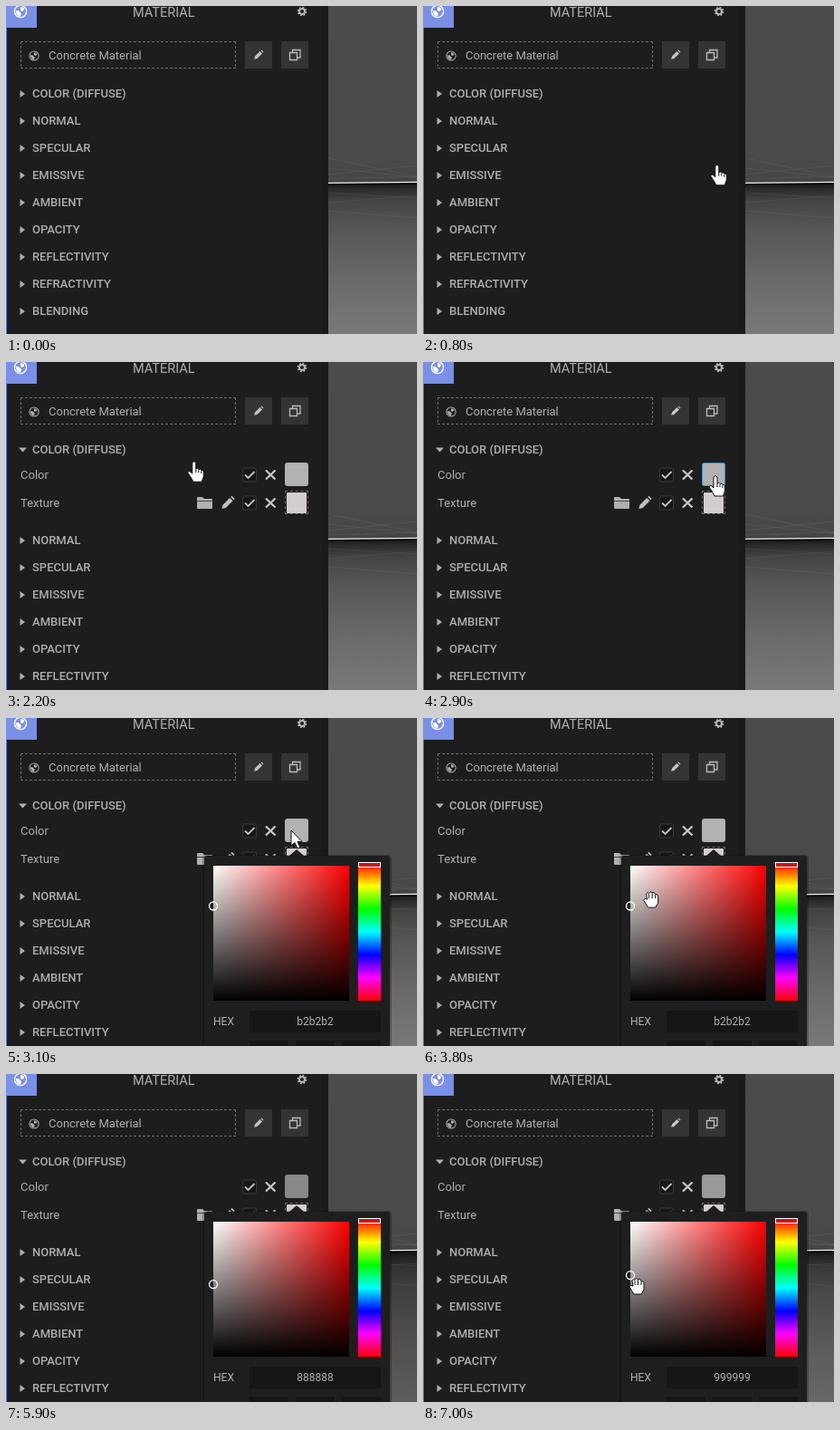
Write an HTML page that moves like this. It is 454 by 362 pixels and loops after 7100 ms.

```html
<!DOCTYPE html>
<html>
<head>
<meta charset="utf-8">
<style>
  html, body { margin: 0; width: 100%; height: 100%; overflow: hidden; background: #1d1d1d; }
  svg { display: block; font: 13px Roboto, sans-serif; fill: #b0b0b0; }
  .row { font-weight: 500; fill: #aeaeae; }
  .cursor { fill: #fff; stroke: #111; stroke-linejoin: round; }
</style>
</head>
<body>
<svg width="454" height="362" viewBox="0 0 454 362">
  <defs>
    <linearGradient id="wall" x2="0" y2="1">
      <stop stop-color="#4b4b4b"/><stop offset=".85" stop-color="#4a4a4a"/><stop offset="1" stop-color="#454545"/>
    </linearGradient>
    <linearGradient id="floor" x2="0" y2="1">
      <stop stop-color="#141414"/><stop offset=".04" stop-color="#2a2a2a"/><stop offset=".12" stop-color="#454443"/>
      <stop offset=".3" stop-color="#585654"/><stop offset=".65" stop-color="#6c6a68"/><stop offset="1" stop-color="#7b7977"/>
    </linearGradient>
    <linearGradient id="sat"><stop stop-color="#fff"/><stop offset="1" stop-color="#f00"/></linearGradient>
    <linearGradient id="val" x2="0" y2="1"><stop stop-opacity="0"/><stop offset="1"/></linearGradient>
    <linearGradient id="hue" x2="0" y2="1"></linearGradient>
    <g id="globe">
      <circle r="6" fill="none" stroke="currentColor" stroke-width="1.200"/>
      <path fill="currentColor" d="M0-4Q3-5 4-2L2 0 0-1ZM-5-1L-2-1 1 2 0 5Q-4 5-5-1Z"/>
    </g>
    <path id="pencil" d="M-6 6-5 2 2-5 5-2-2 5ZM3-6 4-7 7-4 6-3Z"/>
    <g id="toggles">
      <rect x="261.500" y="-7.500" width="15" height="15" rx="2" fill="#171717" stroke="#3a3a3a"/>
      <path d="M264 0l3.500 3.500 7-7" fill="none" stroke="#c4c4c4" stroke-width="1.800"/>
      <path d="M287-5l10.500 10M297.500-5L287 5" stroke="#c8c8c8" stroke-width="2.300"/>
    </g>
  </defs>

  <rect x="356" width="98" height="195" fill="url(#wall)"/>
  <rect x="356" y="195" width="98" height="167" fill="url(#floor)"/>
  <rect id="shade" x="356" y="195" width="98" height="167" fill="#000"/>
  <path d="M356 168l98 20M356 179l98 10M356 186l98-10M356 191l98-3M356 206l98 6M356 217l98-8M356 226l98 8" stroke="#fff" stroke-opacity=".06"/>
  <path d="M356 197L454 196" stroke="#0b0b0b" stroke-width="2"/>
  <path d="M356 195.400L454 194.400" stroke="#eee" stroke-width="1.400"/>

  <rect width="356" height="362" fill="#1d1d1d"/>
  <rect x="349" width="7" height="362" fill="#1a1a1a"/>
  <path d="M0 24H1V362H0Z" fill="#6478cc"/>
  <path d="M0 0H34V24H0Z" fill="#7b8fe6"/>
  <use href="#globe" transform="translate(16 6) scale(1.1)" color="#fff"/>
  <text x="140" y="12" font-size="14.500">MATERIAL</text>
  <g fill="none" stroke="#b8b8b8">
    <circle cx="327" cy="6" r="3" stroke-width="2"/>
    <circle cx="327" cy="6" r="4.600" stroke-width="1.400" stroke-dasharray="1.800 1.810"/>
  </g>
  <path d="M16 39.500H254M16 68.500H254M16.500 39V69M253.500 39V69" stroke="#6c6c6c" stroke-dasharray="3 2"/>
  <use href="#globe" transform="translate(31 55) scale(.85)" color="#b0b0b0"/>
  <text x="47" y="59">Concrete Material</text>
  <path d="M264 39h30v30h-30ZM304 39h30v30h-30Z" fill="#343434"/>
  <use href="#pencil" transform="translate(279 54) scale(.8)" fill="#c4c4c4"/>
  <path d="M313.500 51.500h8v8h-8ZM316.500 51.500v-3h8.500v8.500h-3.500" fill="none" stroke="#bbb" stroke-width="1.300"/>

  <g id="rows" class="row"></g>
  <g id="details">
    <text x="16" y="129">Color</text>
    <text x="16" y="160">Texture</text>
    <use href="#toggles" y="124.500"/>
    <use href="#toggles" y="155.500"/>
    <path d="M211 149h6l2 2h8q1 0 1 1v9q0 1-1 1h-15q-1 0-1-1Z"/>
    <path d="M211 153.500h18" stroke="#1d1d1d" stroke-width=".7"/>
    <use href="#pencil" transform="translate(245 155.500) scale(1.1)" fill="#c0c0c0"/>
    <rect id="swatch" x="308.500" y="111.500" width="25" height="25" rx="2"/>
    <path d="M308 142.500h26M308 167.500h26M308.500 142v26M333.500 142v26" stroke="#6c6c6c" stroke-dasharray="3 2.750"/>
    <rect x="310" y="144" width="22" height="23" rx="1" fill="#d3cecd"/>
  </g>

  <g id="picker">
    <rect x="217" y="151" width="209" height="220" rx="4" fill="#000" opacity=".25"/>
    <path d="M219 155q0-3 3-3h91l8-7 8 7h92q3 0 3 3v207H219Z" fill="#1e1e1e"/>
    <rect x="229" y="163" width="150" height="149" fill="url(#sat)"/>
    <rect x="229" y="163" width="150" height="149" fill="url(#val)"/>
    <rect x="389" y="160" width="25" height="152" fill="url(#hue)"/>
    <rect x="389.500" y="159.500" width="24" height="5" fill="#d01010" stroke="#fff"/>
    <path d="M269 323h145v24H269ZM269 356h43v6h-43ZM320 356h43v6h-43ZM371 356h43v6h-43Z" fill="#161616"/>
    <text x="229" y="339" font-size="12">HEX</text>
    <text id="hex" x="341.500" y="339" font-size="12" text-anchor="middle"></text>
    <circle id="knob" cx="229" r="4.500" fill="none" stroke="#fff" stroke-width="1.300"/>
  </g>

  <g class="cursor">
    <path id="hand" d="M-2 1Q0-2 2 1V8Q4 6 5 8.500 7 7 8 9.500 10.500 8.500 10.500 12V16L8.500 22H-1L-3 18-7 12Q-6 9-4 11L-2 13ZM2 8v4M5 9v3M8 10v3"/>
    <path id="arrow" d="M0 0V17L4 13.500 7 20 10 19 7 12.500H12Z"/>
    <path id="grab" d="M-5-6Q-3.500-9-2-6.500-1-10 1.500-7.500 4-9 5-5.500 8-6 8-2V4L5 9H-3L-8 1Q-7-2-4 0ZM-2-6v5M1.500-7v6M5-5v4"/>
  </g>
</svg>
<script>
const $ = id => document.getElementById(id);
const LOOP = 7100, STEP = 100;
const OPEN = 1800, PICK = 3100, DRAG = 4100, DROP = 6800;

// Keys are [time, ...values]
const POINTER = [[400, 462, 230], [1300, 133, 100], [1900, 133, 100], [2600, 323, 126],
  [3000, 323, 126], [3100, 315, 124], [3300, 315, 124], [4000, 236, 219], [6700, 236, 234]];
const GRAY = [[4100, 178], [4600, 149], [5500, 136], [6200, 136], [6700, 153]];

const names = ['COLOR (DIFFUSE)', 'NORMAL', 'SPECULAR', 'EMISSIVE', 'AMBIENT',
  'OPACITY', 'REFLECTIVITY', 'REFRACTIVITY', 'BLENDING'];
$('rows').innerHTML = names.map((name, i) =>
  `<g><path d="M15.500 ${93 + 30 * i}l5.500 4-5.500 4Z"/><text x="29" y="${101 + 30 * i}">${name}</text></g>`).join('');
$('hue').innerHTML = [0, 1, 2, 3, 4, 5, 6].map(i =>
  `<stop offset="${i / 6}" stop-color="hsl(${i * 60} 100% 50%)"/>`).join('');

const rows = [...$('rows').children];
const show = (id, on) => $(id).style.display = on ? '' : 'none';

function sample(keys, t) {
  const next = keys.findIndex(k => k[0] > t);
  if (next < 0) return keys[keys.length - 1].slice(1);
  if (next === 0) return keys[0].slice(1);
  const a = keys[next - 1], b = keys[next];
  const u = (t - a[0]) / (b[0] - a[0]), e = u * u * (3 - 2 * u);
  return a.slice(1).map((v, i) => v + (b[i + 1] - v) * e);
}

function draw(t) {
  const open = t >= OPEN, picking = t >= PICK;
  rows.forEach((row, i) => row.setAttribute('transform', `translate(0 ${open && i ? 70 : 0})`));
  rows[0].firstChild.setAttribute('d', open ? 'M14 94.500h9l-4.500 5Z' : 'M15.500 93l5.500 4-5.500 4Z');
  show('details', open);
  show('picker', picking);

  const [x, y] = sample(POINTER, t);
  const gray = Math.round(sample(GRAY, t)[0]);
  const hex = gray.toString(16).repeat(3);
  const hover = open && !picking && x > 308;
  $('hex').textContent = hex;
  $('swatch').setAttribute('fill', '#' + hex);
  $('swatch').setAttribute('stroke', hover ? '#3796d3' : '#' + hex);
  $('knob').setAttribute('cy', 162.5 + 149 * (1 - gray / 255));
  $('shade').setAttribute('opacity', 1 - gray / 178);

  const visible = t >= 400 && (t < DRAG || t >= DROP);
  const kind = picking ? (y > 163 ? 'grab' : 'arrow') : x > 349 ? 'arrow' : 'hand';
  for (const id of ['hand', 'arrow', 'grab']) {
    show(id, visible && id === kind);
    $(id).setAttribute('transform', `translate(${x} ${y})`);
  }
}

const start = performance.now();
function tick() {
  const t = (performance.now() - start) % LOOP;
  draw(Math.floor(t / STEP) * STEP);
  requestAnimationFrame(tick);
}
tick();
</script>
</body>
</html>
```
